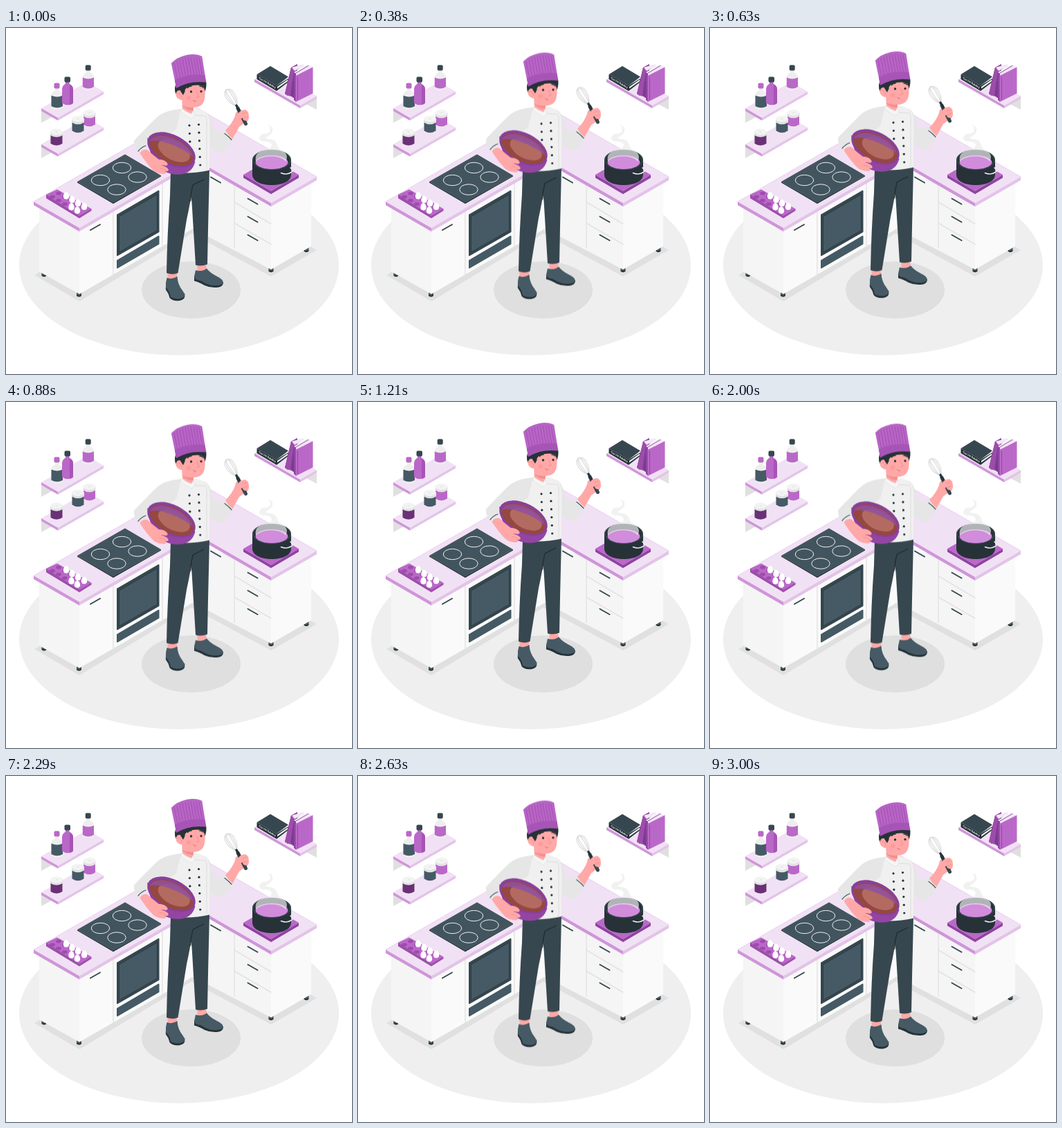
Animation, 500 px wide and 500 px high, one loop 3040 ms. Source, as an HTML page:

```html
<!DOCTYPE html>
<html lang="en">
<head>
<meta charset="utf-8">
<title>Cook in a kitchen</title>
<style>
  html, body { margin: 0; width: 100%; height: 100%; overflow: hidden; background: #fff; }
  svg { display: block; width: 100vw; height: 100vh; }
  .top { fill: #f1e1f4; }
  .edgeL { fill: #cf95d9; }
  .edgeR { fill: #e3c3e9; }
  .slate { fill: #455a64; }
  .dark { fill: #37474f; }
  .ink { fill: #263238; }
  .plum { fill: #ba68c8; }
  .skin { fill: #ffa8a7; }
  .line { fill: none; stroke-linecap: round; stroke-linejoin: round; }
</style>
</head>
<body>
<svg viewBox="0 0 500 500">
  <!-- floor -->
  <ellipse cx="250" cy="343" rx="231" ry="130" fill="#efefef"/>
  <path d="M41 357L48 353L268 226L441 316L449 321L383 359L268 297L106 395Z" fill="#e0e0e0"/>
  <ellipse cx="267.5" cy="378.5" rx="71.5" ry="41.3" fill="#dfdfdf"/>

  <g id="feet"></g>

  <!-- cabinets -->
  <path d="M48 258L106 292V384.500L48 352Z" fill="#f5f5f5"/>
  <path d="M106 292L270 198V290L106 384.500Z" fill="#fafafa"/>
  <path d="M270 198L383 256V349L270 290Z" fill="#f5f5f5"/>
  <path d="M383 256L441 222V315.500L383 349Z" fill="#fafafa"/>
  <g class="line" stroke="#e3e3e3" stroke-width="1.500">
    <path d="M155 266V357M226 224V316M330 228V318"/>
    <path d="M330 251.500L383 283M330 282L383 312.500"/>
  </g>
  <path d="M161 270L220.500 235.500V294.500L161 328.500Z" fill="#37474f" stroke="#37474f" stroke-width="2" stroke-linejoin="round"/>
  <path d="M163.500 272.500L218.500 240.500V292.500L163.500 324Z" fill="#455a64" stroke="#263238" stroke-width=".7"/>
  <path d="M161 336L220.500 301V312L161 346.500Z" fill="#455a64" stroke="#455a64" stroke-width="2" stroke-linejoin="round"/>
  <g id="handles" class="line" stroke="#37474f" stroke-width="2"></g>

  <!-- worktops -->
  <path class="top" d="M40 251L275.600 115L449 215L383 253L275.600 191L106 289Z"/>
  <path class="edgeL" d="M40 251L106 289V294L40 256ZM275.600 191L383 253V258L275.600 196Z"/>
  <path class="edgeR" d="M106 289L275.600 191V196L106 294ZM383 253L449 215V220L383 258Z"/>
  <path class="line" d="M40 251L275.600 115L449 215" stroke="#dfbde6" stroke-width=".6"/>

  <!-- hob -->
  <path class="ink" d="M103 222L155 252L224 213V214.500L155 254L103 223.500Z"/>
  <path d="M103 222L172 182.500L224 213L155 252.500Z" fill="#42555f"/>
  <g id="burners" fill="none" stroke="#f0f0f0" stroke-width="1"></g>

  <!-- egg tray -->
  <path d="M58 241L74 233.500L123.500 261.500V264L106 275L58 246Z" fill="#9c4dab"/>
  <path class="plum" d="M58 241L74 233.500L123.500 261.500L106 271.500Z"/>
  <g id="eggs"></g>

  <g id="shelves"></g>

  <!-- bottles -->
  <g transform="translate(0 .4)">
    <path d="M71 86H76.500V90Q82 92 82 97V115Q74 120 65.500 115V97Q65.500 92 71 90Z" fill="#eeeeee"/>
    <path class="slate" d="M65.500 97Q74 101 82 97V112.500Q74 117 65.500 112.500Z"/>
    <rect class="plum" x="69.500" y="79" width="8" height="8" rx="2"/>
    <path d="M86 77H91.500V80Q97 83 97 88V108Q89 113.500 81 108V88Q81 83 86 80Z" fill="#ba68c8"/>
    <path d="M92 81Q97 83 97 88V108Q95 110 92 110.500Z" fill="#a654b5"/>
    <rect class="dark" x="84.500" y="70" width="8.500" height="8" rx="2"/>
    <path d="M116 60H121.500V64Q127 66 127 71V87Q119 92 110.800 87V71Q110.800 66 116 64Z" fill="#eeeeee"/>
    <path class="plum" d="M110.800 71Q119 75 127 71V84.500Q119 89.500 110.800 84.500Z"/>
    <rect class="dark" x="114.700" y="53" width="8" height="8" rx="2"/>
  </g>
  <g id="jars"></g>

  <!-- books -->
  <path class="ink" d="M362.500 67L391 83.500L408 73V78L391 91L362.500 74Z"/>
  <path d="M392 85L407 74.500V77L392 87.500Z" fill="#f2f2f2"/>
  <path class="dark" d="M362.500 67L382 55L408 70.500L391 83.500Z"/>
  <text transform="matrix(.82 .48 0 1 365.500 73.400)" font-family="Inter, Arial, sans-serif" font-size="4.300" font-weight="600" fill="#fff">Corvin Daleby</text>
  <path d="M403 95L412 57L421 52L421 90L407 98Z" fill="#8e44a0"/>
  <path d="M412 57L430 53L419 62L411 99L403 95Z" fill="#9c4dab"/>
  <path d="M413 57L428 52.500L431 54.500L417 62Z" fill="#f3e7f6"/>
  <path d="M411 98L416 63L420 64V104Z" fill="#7d3c8c"/>
  <path d="M416 64L435 53L443.500 57L419 69Z" fill="#f3e7f6"/>
  <path d="M416 64L419 66V106.500L416 104Z" fill="#8e44a0"/>
  <path class="plum" d="M418.500 69L443.500 56.500V94.500L418.500 107Z"/>
  <path class="line" d="M418.500 65.500L437 54.500M421.500 71V103.500" stroke="#8e44a0" stroke-width=".9"/>

  <!-- pot -->
  <path d="M343 212L383 235.500L423 212V216.500L383 240L343 216.500Z" fill="#8e44a0"/>
  <path class="plum" d="M343 212L383 189L423 212L383 235.500Z"/>
  <path class="ink" d="M356 190V212C356 232 412 232 412 212V190Z"/>
  <ellipse cx="384" cy="190.500" rx="28" ry="14.800" fill="#37474f"/>
  <ellipse cx="384" cy="190.500" rx="26.300" ry="13.500" fill="#263238"/>
  <ellipse cx="384" cy="194" rx="23.500" ry="10" fill="#d18cdc"/>
  <path class="line" d="M411 202Q417 206 412 208.500Q406 213 397.500 209.500" stroke="#e8e8e8" stroke-width="1.600"/>
  <path d="M361 193C359 182 365 178 376 176C389 172 384 164 374 164C362 164 365 153 374 153C383 152 384 147 379 140C388 143 387 152 379 156C373 160 376 160 384 161C394 164 390 171 397 176C408 181 407 188 404 193C398 183 370 183 361 193Z" fill="#ebebeb" opacity=".7"/>

  <!-- cook -->
  <g id="cook">
    <path class="skin" d="M233 350H247V366H234ZM276 338H289L290 353L277 354Z"/>
    <path class="ink" d="M231 371L230.800 378Q235 383 236.500 390Q242 395.500 251 394Q258 392.500 258.300 388V384ZM272 358V365.500Q279 367 287 372Q297 376.500 308 374.500Q314 373 314 367Z"/>
    <path class="slate" d="M232.500 361Q240 364 247.500 359Q248 371 255.500 380Q260.500 387 256 389.500Q248 393.500 238 389Q237 381 231 375Q230.500 367 232.500 361Z"/>
    <path class="slate" d="M274 350Q283 353 290 347.500Q295 354 305 359Q315 363.500 313.500 369Q308 374 295 371.500Q287 369 281 365Q272 364 272 359Z"/>

    <path class="dark" d="M262 208L294 203L293.500 227Q292 285 291 341.500Q282 345 274 342.500L268.500 252Z"/>
    <path class="dark" d="M238 205L289 207Q288 219 280 223L270 226Q267 250 261 277L248.500 354Q241 357.500 232 354Q233 297 237 243Z"/>
    <path class="line" d="M286 219Q277 223 270 227Q267 239 266.500 250" stroke="#202b30" stroke-width="1.200"/>

    <!-- jacket -->
    <path d="M285 120C294 123 295 130 299 143L303 151L317 147.500L329 160C322 170 314 183 307 180C299 178 294 171 288 163Z" fill="#e6e6e6"/>
    <path d="M250 119C261 113 284 115 291 125Q295 130 294.500 151L294 205.500Q266 212 238 208L231 136Z" fill="#f0f0f0"/>
    <path class="line" d="M269 126L288 127Q291 130 290 141L290 206" stroke="#dedede" stroke-width="1"/>
    <path d="M253 117C240 118 227 121 218 129C207 140 190 157 185 163Q184 173 193 181L205 168Q221 169 230 158L246 146Z" fill="#e6e6e6"/>
    <path class="line" d="M191 178Q196 172 202 170M316 152.500Q322 157 326 161.500" stroke="#455a64" stroke-width="1.200"/>
    <g id="buttons" class="ink"></g>

    <!-- head -->
    <path class="skin" d="M254 101H272L270 125Q261 126 255 118Z"/>
    <path d="M254 112Q263 116 271 114L270.500 119Q262 120 254 112Z" fill="#f28f8f"/>
    <path d="M254 116Q261 122 268 124L271 119L273 127L268 131Q258 126 252.500 121Z" fill="#f5f5f5" stroke="#dddddd" stroke-width=".6"/>
    <path class="ink" d="M245 82Q241.500 93 249 100L253 104L258 95L281 86L287.500 92Q290.500 84 289 76L262 74Z"/>
    <path class="skin" d="M256.500 92Q260 85 270 83Q280 81 287 85.500Q289 100 285 108Q281 115 270 115Q259 114 255 105Z"/>
    <path class="skin" d="M256 94Q252 88 247.500 91Q243 96 248 101.500Q253 106 257 101Z"/>
    <path class="line" d="M248 94Q253 94 254 100" stroke="#f28f8f" stroke-width="1"/>
    <path class="ink" d="M254 83L265 80Q258 86 258.500 92L256 97L252 91ZM283 79L289 77L287.500 91Q285 84 283 79Z"/>
    <ellipse cx="264" cy="101" rx="3.600" ry="3" fill="#f78f91" opacity=".45"/>
    <circle class="ink" cx="267.500" cy="92" r="1.700"/>
    <circle class="ink" cx="282" cy="91.700" r="1.600"/>
    <path class="line" d="M262.500 86.500Q265 83.500 268 84M280 84Q283 83.500 285 86" stroke="#263238" stroke-width="1.500"/>
    <path class="line" d="M275.500 92L279 99.500L275.500 100.500" stroke="#f28f8f" stroke-width="1"/>
    <path class="line" d="M270.500 104.500Q272 106.500 274.500 106" stroke="#d9686c" stroke-width="1"/>

    <!-- hat -->
    <path d="M238.800 51Q247 42 261 39Q275 36.500 283.300 41L289 77Q266 74 246 86Z" fill="#b865c6"/>
    <g id="pleats" class="line" stroke="#9646a6" stroke-width=".8" opacity=".8"></g>
    <path d="M243.800 75Q264 64.500 287.500 68L289 78.500Q265 75.500 246 87Z" fill="#a655b6"/>

    <!-- whisk and raised hand -->
    <g id="whisk" class="line" transform="translate(333 112) rotate(-32)" stroke="#d5d5d5" stroke-width=".9"></g>
    <path class="skin" d="M317 148Q327 138 331 127Q331 121 337 119L349 123Q353 130 348 136Q341 139 337 143L327.500 160Q321 155 317 148Z"/>
    <path class="line" d="M335 116L346.500 138.500" stroke="#37474f" stroke-width="5"/>
    <path class="line" d="M333 112L337 119" stroke="#263238" stroke-width="3.500"/>
    <path class="skin" d="M335 125Q338 118 346 118Q351 120 351 128Q351 133 347 134Q342 134 342 130Q338 132 337 128Z"/>
    <path class="line" d="M342 124L347 122.500M343 130L348.500 128" stroke="#f28f8f" stroke-width=".9"/>

    <!-- bowl -->
    <path d="M204 159Q207 184 219 198Q230 213 252 211.500Q269 210 273.500 193Z" fill="#9345a3"/>
    <g transform="translate(239 176) rotate(27)">
      <ellipse rx="37.500" ry="21.500" fill="#8a3f9b"/>
      <ellipse cx=".5" cy=".5" rx="34" ry="18.300" fill="#94483f"/>
      <ellipse cx="4" cy="-.5" rx="25" ry="13.500" fill="#b36a61"/>
      <path d="M-33 3C-22 -8 18 -10 32.500 -5A34 18.300 0 0 0 -33 3Z" fill="#9150a3" opacity=".85"/>
    </g>

    <!-- lower hand -->
    <path class="skin" d="M193.500 181Q197 175 204 176Q213 184 221 190Q229 190 233 195Q235 198 231 199Q227 198 224 198.500Q233 200 235 205Q234 208 229 207Q233 210 229 211Q221 211 214 207Q203 196 193.500 181Z"/>
    <path class="line" d="M222 202Q227 203 231 206" stroke="#f28f8f" stroke-width=".9"/>
  </g>
</svg>
<script>
  const put = (id, html) => { document.getElementById(id).innerHTML = html; };
  const each = (list, draw) => list.map(draw).join('');

  put('feet', each([[55, 356], [105.5, 385], [383, 349.5], [434, 320.5]], ([x, y]) =>
    `<path class="slate" d="M${x - 3.5} ${y - 4}h7v5q-3.500 3-7 0Z"/>
     <path class="ink" d="M${x - 3.5} ${y}q3.500 3 7 0v2q-3.500 3-7 0Z"/>`));

  const handles = [[122, 292, -8], [296, 215.5, 8], [349.5, 246.5, 8], [349.5, 272.5, 8], [349.5, 299, 8]];
  put('handles', each(handles, ([x, y, dy]) => `<path d="M${x} ${y}l14 ${dy}"/>`));

  put('burners', each([[167.5, 202], [190, 215.5], [136.5, 220], [160, 233.5]], ([x, y]) =>
    `<ellipse cx="${x}" cy="${y}" rx="13.200" ry="7.700"/>`));

  // tray cups run along two axes of the isometric grid
  let tray = '';
  for (let row = 0; row < 2; row++) {
    for (let i = 0; i < 5; i++) {
      const x = 76 + i * 9 - row * 9, y = 239 + i * 5.2 + row * 5;
      tray += `<ellipse cx="${x}" cy="${y}" rx="3.800" ry="2.400" fill="#9c4dab"/>`;
    }
  }
  const eggs = [[87, 242.5], [95.5, 248], [104, 253], [113, 258], [94.5, 258.5], [103, 263.5]];
  put('eggs', tray + each(eggs, ([x, y]) =>
    `<path d="M${x} ${y - 5.5}c2.800 0 4.300 4.500 4.200 7c-.5 4.800-8 4.800-8.400 0c-.2-2.500 1.400-7 4.200-7Z" fill="#fff"/>
     <path d="M${x - 4} ${y + 3}q4 3.500 8-.5q-2 4.500-8 .5Z" fill="#e3d5e7"/>`));

  const SLOPE = 0.577;
  const slab = (x, y, a, b) => {
    const front = y + a * SLOPE, rise = b * SLOPE;
    return `<path class="top" d="M${x} ${y}L${x + a} ${front}l${b} ${-rise}L${x + b} ${y - rise}Z"/>
      <path class="edgeL" d="M${x} ${y}L${x + a} ${front}v4L${x} ${y + 4}Z"/>
      <path class="edgeR" d="M${x + a} ${front}l${b} ${-rise}v4l${-b} ${rise}Z"/>`;
  };
  const bracket = (x, y, w) => `<path d="M${x} ${y}v17l${w} -8.500Z" fill="#e0e0e0"/>`;
  put('shelves', bracket(51, 120, 16) + slab(51, 116, 24, 66) +
    bracket(51, 171, 16) + slab(51, 168, 24, 66) +
    bracket(449, 101, -16) + slab(359, 74, 66, 24));

  const jars = [[120.5, 122.4, '#ba68c8'], [104, 131.4, '#455a64'], [73, 150, '#6a3176']];
  put('jars', each(jars, ([x, y, color]) =>
    `<path d="M${x - 8.5} ${y + 4}v13q8.500 5.500 17 0v-13Z" fill="${color}"/>
     <path d="M${x - 9} ${y}v5q9 5.500 18 0v-5Z" fill="#e2e2e2"/>
     <ellipse cx="${x}" cy="${y}" rx="9" ry="4.500" fill="#f3f3f3"/>
     <ellipse cx="${x}" cy="${y}" rx="1.500" ry=".7" fill="#ddd"/>`));

  let buttons = '';
  for (let i = 0; i < 6; i++) {
    buttons += `<circle cx="${278.5 + i * 0.45}" cy="${139.5 + i * 11.7}" r="1.600"/>
      <circle cx="${265 + i * 0.4}" cy="${140.8 + i * 11.7}" r="1.600"/>`;
  }
  put('buttons', buttons);

  let pleats = '';
  for (let i = 1; i < 11; i++) {
    const u = i / 11, arch = 4 * u * (1 - u);
    const topX = 239 + 44 * u, topY = 53 - 9 * u - arch * 6;
    const endX = 243.5 + 44 * u, endY = 75 - 7 * u - arch * 4;
    pleats += `<path d="M${topX} ${topY}L${endX} ${endY}"/>`;
  }
  put('pleats', pleats);

  put('whisk', each([8, 5, 2], w =>
    `<path d="M-1 0C${-w} -8 ${-w - 2} -27 0 -27C${w + 2} -27 ${w} -8 1 0"/>`));

  // linear float at 24 steps a second, with a short rest at the end
  const LOOP = 3040, HALF = 1500;
  const pose = (y, at, easing = 'linear') =>
    ({ transform: `translateY(${y}px)`, offset: at / LOOP, easing });
  document.getElementById('cook').animate([
    pose(0, 0, 'steps(36)'),
    pose(-10, HALF, 'steps(36)'),
    pose(0, 2 * HALF),
    pose(0, LOOP)
  ], { duration: LOOP, iterations: Infinity });
</script>
</body>
</html>
```
